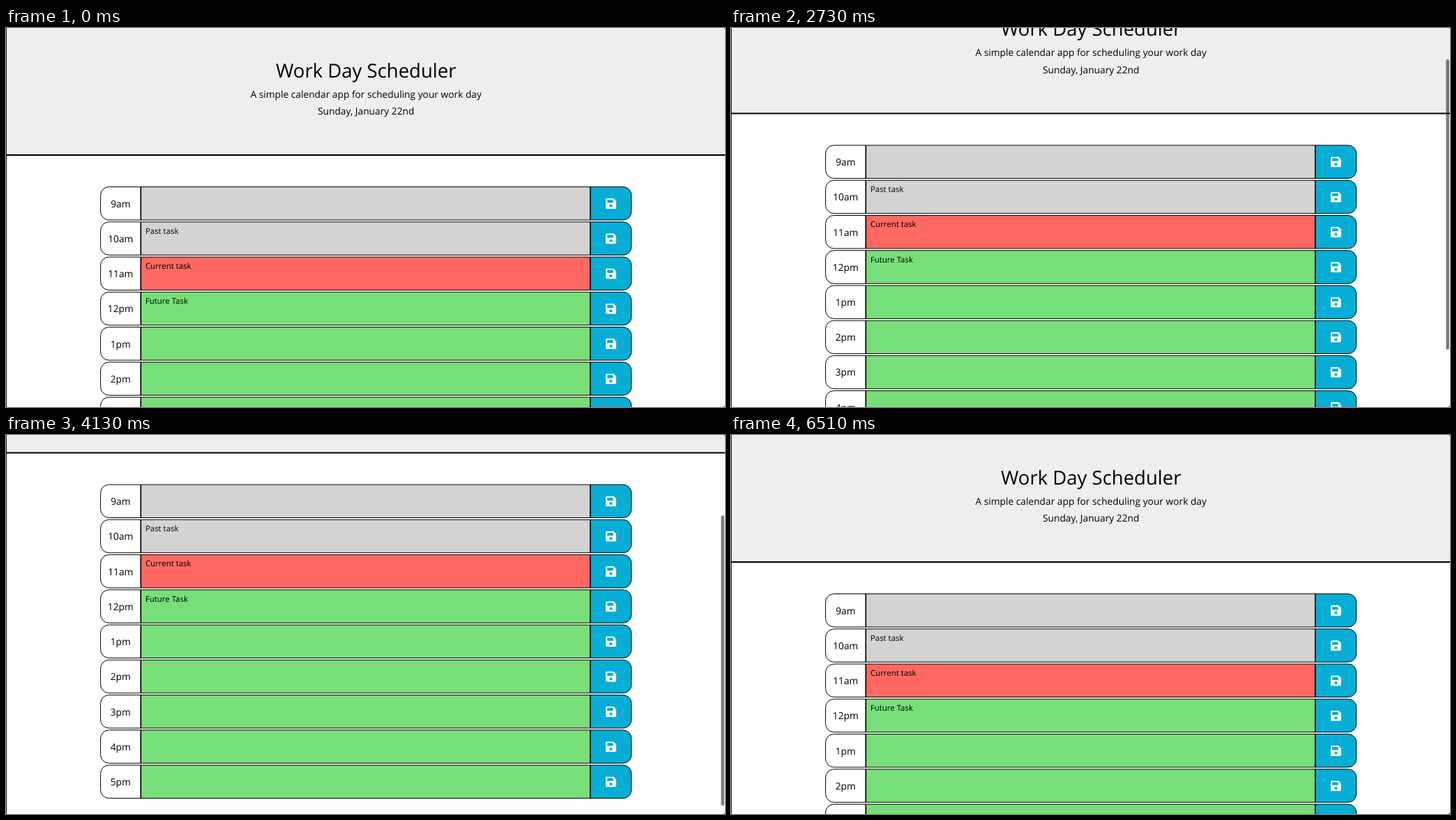
These frames come from a looping animation (1031x543 px, 8000 ms). An HTML page:

```html
<!DOCTYPE html>
<html lang="en">
<head>
<meta charset="utf-8">
<title>Work Day Scheduler</title>
<style>
  html, body { margin: 0; width: 100%; height: 100%; overflow: hidden; background: #1a1a1a; }
  svg { display: block; width: 1031px; height: 543px; clip-path: inset(0 0 0 1px round 0 3px 3px 0); }
  text { font: 13.75px "Open Sans", "Noto Sans", sans-serif; text-rendering: geometricPrecision; }
  .mid { text-anchor: middle; }
  .title { font-size: 27.5px; }
  .task { font-size: 11.45px; }
  .past { fill: #d3d3d3; }
  .present { fill: #ff6961; }
  .future { fill: #77df78; }
  .save { fill: #06aed5; }
  .line { fill: none; stroke: #000; }
</style>
</head>
<body>
<svg viewBox="0 0 1031 543">
  <defs>
    <symbol id="disk" viewBox="0 0 448 448" width="15" height="15">
      <path fill="#fff" fill-rule="evenodd" d="M48 0H316Q336 0 350 14L434 98Q448 112 448 132V400A48 48 0 0 1 400 448H48A48 48 0 0 1 0 400V48A48 48 0 0 1 48 0Z
        M76 64Q64 64 64 76V180Q64 192 76 192H308Q320 192 320 180V80Q320 76 317 72L313 68Q309 64 304 64Z
        M160 320A64 64 0 0 0 288 320A64 64 0 0 0 160 320Z"/>
    </symbol>
  </defs>
  <rect width="1031" height="543" fill="#fff"/>
  <g id="page">
    <rect width="1031" height="181" fill="#eee"/>
    <rect y="181" width="1031" height="2"/>
    <text class="mid title" x="516.2" y="70.8">Work Day Scheduler</text>
    <text class="mid" x="516.2" y="99.8">A simple calendar app for scheduling your work day</text>
    <text class="mid" x="516.2" y="124.4">Sunday, January 22nd</text>
    <g id="rows"></g>
  </g>
  <rect id="thumb" x="1025.3" width="4.6" height="416" rx="2.3" fill="#000" fill-opacity=".51"/>
</svg>
<script>
const LOOP = 8000, STEP = 70;
const page = document.getElementById('page');
const thumb = document.getElementById('thumb');

const hours = ['9am', '10am', '11am', '12pm', '1pm', '2pm', '3pm', '4pm', '5pm'];
const tasks = ['', 'Past task', 'Current task', 'Future Task'];
const NOW = 2;

function row(hour, i) {
  const state = i < NOW ? 'past' : i === NOW ? 'present' : 'future';
  return `<g transform="translate(0 ${227.6 + i * 50.24})">
    <rect class="${state}" x="193" width="645" height="47.4"/>
    <path class="save" d="M838 0H884.8a12 12 0 0 1 12 12V35.4a12 12 0 0 1 -12 12H838Z"/>
    <rect class="line" x="135.6" width="761.2" height="47.4" rx="12"/>
    <path class="line" stroke-width="1.7" d="M193.3 0V47.4M837.8 0V47.4"/>
    <text class="mid" x="164.3" y="29">${hour}</text>
    <text class="task" x="199.9" y="16.8">${tasks[i] || ''}</text>
    <use href="#disk" x="859.9" y="16.4"/>
  </g>`;
}
document.getElementById('rows').innerHTML = hours.map(row).join('');

// [time, scroll offset, speed per step]
const keys = [
  [0, 0, 0], [2310, 0, 0], [2380, 1.4, 2.5], [3080, 136.5, 10], [3500, 163, 0],
  [3780, 163, 0], [4130, 156.5, 4 * -1], [4690, 56, -16], [5110, -1.6, 0],
  [5250, -1.6, 0], [5390, -1, 0], [6020, -1, 0], [6510, 0, 0], [LOOP, 0, 0]
];

// Cubic Hermite interpolation between neighbouring keys
function scrollAt(t) {
  const n = keys.findIndex(k => k[0] > t);
  const [t0, p0, v0] = keys[n - 1], [t1, p1, v1] = keys[n];
  const u = (t - t0) / (t1 - t0), w = 1 - u, steps = (t1 - t0) / STEP;
  return w * w * (1 + 2 * u) * p0 + u * u * (3 - 2 * u) * p1
    + steps * u * w * (w * v0 - u * v1);
}

function thumbOpacity(t) {
  if (t < 2380 || t >= 5810) return 0;
  return t < 5670 ? 1 : 1 - (t - 5600) / 210;
}

function draw(now) {
  const t = Math.floor(now % LOOP / STEP) * STEP;
  const y = scrollAt(t);
  page.setAttribute('transform', `translate(0 ${-y})`);
  thumb.setAttribute('y', 1.7 + Math.max(0, y) * 0.725);
  thumb.setAttribute('opacity', thumbOpacity(t));
}

let start;
function tick(now) {
  start ??= now;
  draw(now - start);
  requestAnimationFrame(tick);
}
draw(0);
requestAnimationFrame(tick);
</script>
</body>
</html>
```
